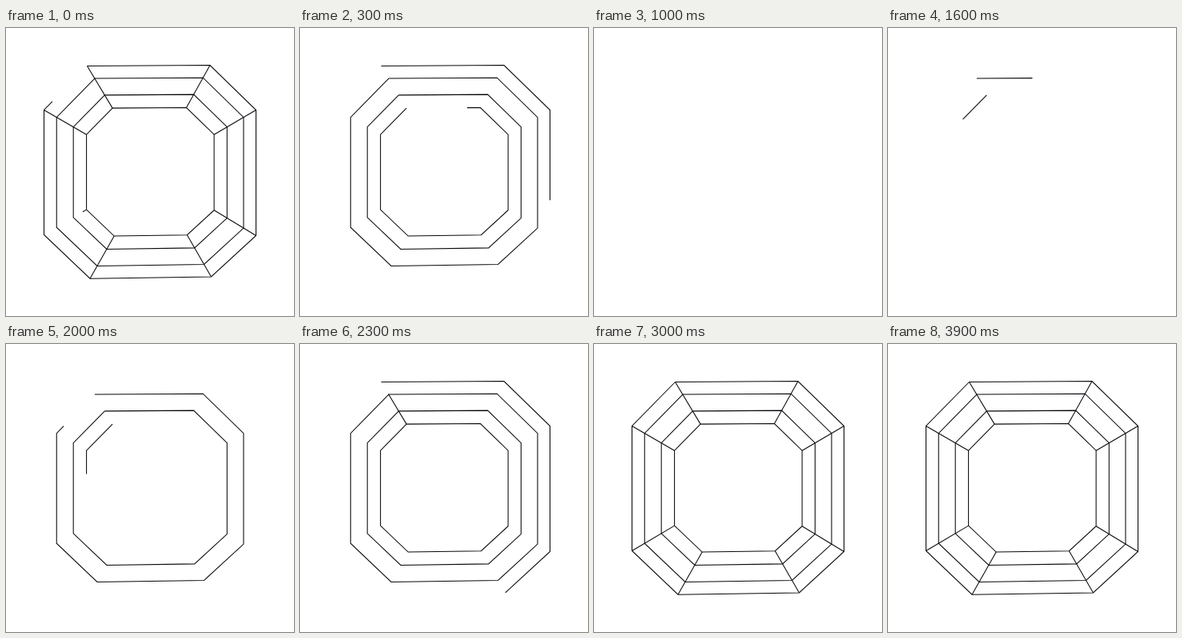
An HTML page for the animation above (4000 ms loop, 360 by 360 pixels).

```html
<!DOCTYPE html>
<html lang="en">
<head>
<meta charset="utf-8">
<title>Octagon line drawing</title>
<style>
  html, body { margin: 0; width: 100%; height: 100%; overflow: hidden; background: #fff; }
  svg { display: block; width: 100vw; height: 100vh; }
  polyline { fill: none; stroke: #08080e; stroke-width: 1.05; }
</style>
</head>
<body>
<svg viewBox="0 0 360 360"><g transform="translate(.5 .5)"></g></svg>
<script>
const LOOP = 4000, STEP = 100;
const TURN = 1300;      // before this the drawing is undone, after it is redrawn
const REWIND = 2531;    // drawing time at which the loop opens
const CENTER = [180.4, 179.2];

// Hand-drawn octagon, clockwise from the upper left; every ring is a scaled copy.
const corners = [[101, 47], [254.5, 46], [312, 102], [312, 259], [256, 310.5], [104.5, 312.7], [47, 258], [47, 102]];

const scaled = (corner, scale) => corner.map((v, axis) => CENTER[axis] + (v - CENTER[axis]) * scale);
const clockwise = scale => [...corners, corners[0]].map(corner => scaled(corner, scale));
const counterclockwise = scale => clockwise(scale).reverse();
const spoke = corner => [scaled(corner, 0.602), corner];

const canvas = document.querySelector('g');
const strokes = [];

// Draws the paths one after another at a steady speed and returns the finishing time.
function trace(paths, start, speed) {
  for (const points of paths) {
    const line = document.createElementNS('http://www.w3.org/2000/svg', 'polyline');
    line.setAttribute('points', points.join(' '));
    canvas.append(line);
    const length = line.getTotalLength();
    strokes.push({ line, start, speed, length });
    start += length / speed;
  }
  return start;
}

const [first, ...others] = corners;
const spokes = [first, others.pop(), ...others].map(spoke);

trace([clockwise(0.882), clockwise(1)], 1560, 1.74);
const ringsDone = trace([counterclockwise(0.725), counterclockwise(0.602)], 1576, 1.77);
trace(spokes, ringsDone, 1.68);

function render(now) {
  const time = Math.floor((now % LOOP) / STEP) * STEP;
  const pen = time < TURN ? REWIND - time : time;
  for (const { line, start, speed, length } of strokes) {
    const drawn = (pen - start) * speed;
    line.style.visibility = drawn > 0 ? 'visible' : 'hidden';
    line.style.strokeDasharray = drawn > 0 && drawn < length ? `${drawn} ${length * 2}` : 'none';
  }
}

const began = performance.now();
function tick() {
  render(performance.now() - began);
  requestAnimationFrame(tick);
}
tick();
</script>
</body>
</html>
```
